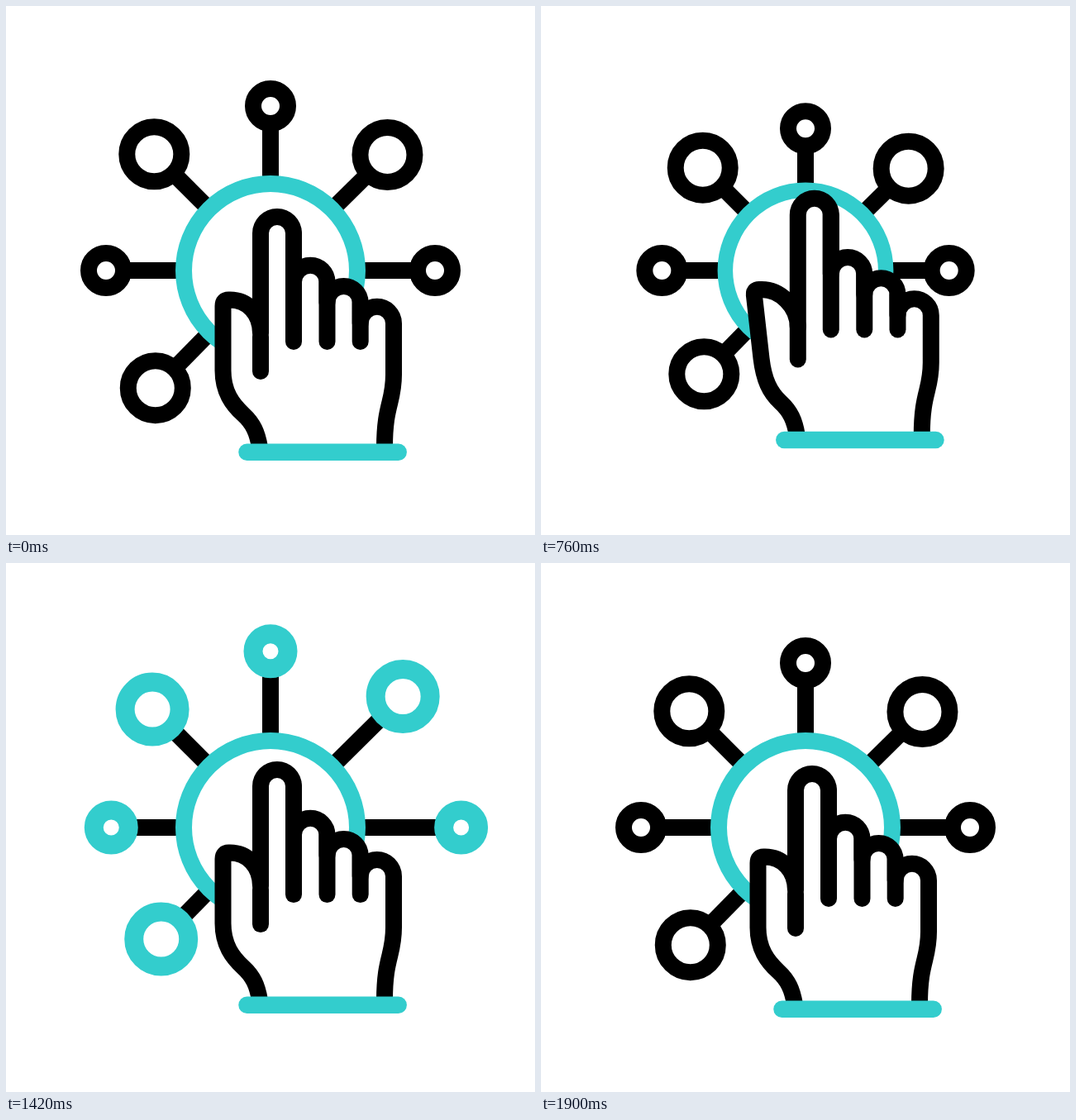
Write an HTML page with a canvas that moves like this. It is 640 px wide and 640 px high and loops after 2.48 s.

```html
<!DOCTYPE html>
<html lang="en">
<head>
<meta charset="utf-8">
<title>Tap and spread</title>
<style>
html, body { margin: 0; width: 100%; height: 100%; overflow: hidden; background: #fff; }
canvas { display: block; }
</style>
</head>
<body>
<canvas id="stage" width="640" height="640"></canvas>
<script>
const ctx = document.getElementById('stage').getContext('2d');
const LOOP = 2480, MID = 320, REACH = 199;
const BLACK = [0, 0, 0], TEAL = [51, 205, 205];

// angle in degrees, ring radius, inward pull, outward swing, rebound
const nodes = [
  [134.4, 33, -0.124, 0.172, -0.05],
  [180, 21, -0.133, 0.14, -0.045],
  [225, 33, -0.122, 0.175, -0.05],
  [270, 21, -0.143, 0.182, -0.08],
  [315.3, 33, -0.124, 0.17, -0.06],
  [0, 21, -0.133, 0.165, -0.062]
];

const clamp = x => Math.max(0, Math.min(1, x));
const part = (t, a, b) => clamp((t - a) / (b - a));
const mix = (a, b, k) => a + (b - a) * k;
const sine = x => (1 - Math.cos(Math.PI * x)) / 2;
const rgb = c => `rgb(${c.map(Math.round).join(',')})`;
const tint = k => rgb(BLACK.map((v, i) => mix(v, TEAL[i], k)));

function track(t, keys) {
  if (t <= keys[0][0]) return keys[0][1];
  for (let i = 1; i < keys.length; i++) {
    const [a, from] = keys[i - 1], [b, to] = keys[i];
    if (t <= b) return mix(from, to, sine(part(t, a, b)));
  }
  return keys[keys.length - 1][1];
}

function line(x1, y1, x2, y2, color, width, cap) {
  ctx.beginPath();
  ctx.moveTo(x1, y1);
  ctx.lineTo(x2, y2);
  ctx.strokeStyle = color;
  ctx.lineWidth = width;
  ctx.lineCap = cap;
  ctx.stroke();
}

function ring(x, y, r, width, color) {
  ctx.beginPath();
  ctx.arc(x, y, r, 0, Math.PI * 2);
  ctx.fillStyle = '#fff';
  ctx.fill();
  ctx.strokeStyle = color;
  ctx.lineWidth = width;
  ctx.stroke();
}

const easeIn = t => 1 - Math.pow(1 - part(t, 60, 1040), 2.5);

// pulled in, thrown out at a steady speed, then settling
function shiftAt(t, start, pull, swing, back) {
  const u = t - start;
  if (u < 0) return pull * easeIn(t);
  if (u < 180) return mix(pull * easeIn(start), swing, u / 180);
  return track(u, [[180, swing], [230, swing - 0.004], [440, back], [720, 0]]);
}

function drawNode([deg, r, pull, swing, back], i, t) {
  const start = 978 + i * 40, u = t - start;
  const k = part(u, 0, 142) - part(u, 585, 715);
  const dist = REACH * (1 + shiftAt(t, start, pull, swing, back));
  const a = deg * Math.PI / 180, dx = Math.cos(a), dy = Math.sin(a);
  line(MID + dx * 100, MID + dy * 100,
    MID + dx * (dist - r), MID + dy * (dist - r), '#000', 20, 'butt');
  ring(MID + dx * dist, MID + dy * dist, r, 20 + 3 * k, tint(k));
}

function drawHub(t) {
  const grow = t < 840 ? -0.0113 * t
    : track(t, [[840, -9.5], [1060, 4.2], [1210, 0]]);
  const s = 1 + grow / 115;
  ring(MID, MID, 105 * s, 20 * s, rgb(TEAL));
}

function drawHand(t) {
  const lift = t < 440 ? sine(part(t, 60, 440)) : 1 - part(t, 440, 960) ** 2;
  const press = track(t, [[950, 0], [1020, 1], [1180, 0]]);
  const drift = Math.sin(Math.PI * part(t, 1080, 1900));
  const s = 1 - 0.033 * press, k = lift;
  const tip = 275 - 12.4 * k + 17.5 * press, bend = 8 * k;
  const fingers = [[348, 388.5, 334], [388.5, 428.7, 359], [428.7, 469, 384]];

  ctx.save();
  ctx.translate(382.5 + 4.5 * k, 410 - 23.6 * k - 5.1 * drift);
  ctx.scale(s, s);
  ctx.translate(-382.5, -410);

  ctx.beginPath();
  ctx.moveTo(307, 534);
  ctx.bezierCurveTo(304, 516, 299, 505, 287, 494);
  ctx.bezierCurveTo(274, 482, 262.5 + 7 * k, 467, 262.5 + 2 * k, 441);
  ctx.lineTo(262.5 - 12 * k, 363 + 2 * k);
  ctx.quadraticCurveTo(262.5 - 13 * k, 355 + 3 * k, 270 - 12 * k, 355.5 + 3.5 * k);
  ctx.bezierCurveTo(292 - 9 * k, 355 + 3 * k, 308, 372 + 10 * k, 308, 396 + 12 * k);
  ctx.lineTo(308, tip);
  ctx.arc(328, tip, 20, Math.PI, 0);
  for (const [x1, x2, y] of fingers) {
    ctx.lineTo(x1, y + bend);
    ctx.arc((x1 + x2) / 2, y + bend, (x2 - x1) / 2, Math.PI, 0);
  }
  ctx.lineTo(469, 446);
  ctx.bezierCurveTo(469, 480, 458, 482, 458, 534);
  ctx.fillStyle = '#fff';
  ctx.fill();
  ctx.strokeStyle = '#000';
  ctx.lineWidth = 20;
  ctx.lineCap = 'butt';
  ctx.lineJoin = 'round';
  ctx.stroke();

  line(308, 400, 308, 442, '#000', 20, 'round');
  line(348, tip, 348, 406, '#000', 20, 'round');
  line(388.5, 334 + bend, 388.5, 406, '#000', 20, 'round');
  line(428.7, 359 + bend, 428.7, 406, '#000', 20, 'round');
  line(291.5, 539.7, 474.7, 539.7, rgb(TEAL), 20.5, 'round');
  ctx.restore();
}

function draw(t) {
  ctx.fillStyle = '#fff';
  ctx.fillRect(0, 0, 640, 640);
  nodes.forEach((n, i) => drawNode(n, i, t));
  drawHub(t);
  drawHand(t);
}

const begin = performance.now();
function frame(now) {
  draw(Math.max(0, now - begin) % LOOP);
  requestAnimationFrame(frame);
}
draw(0);
requestAnimationFrame(frame);
</script>
</body>
</html>
```
